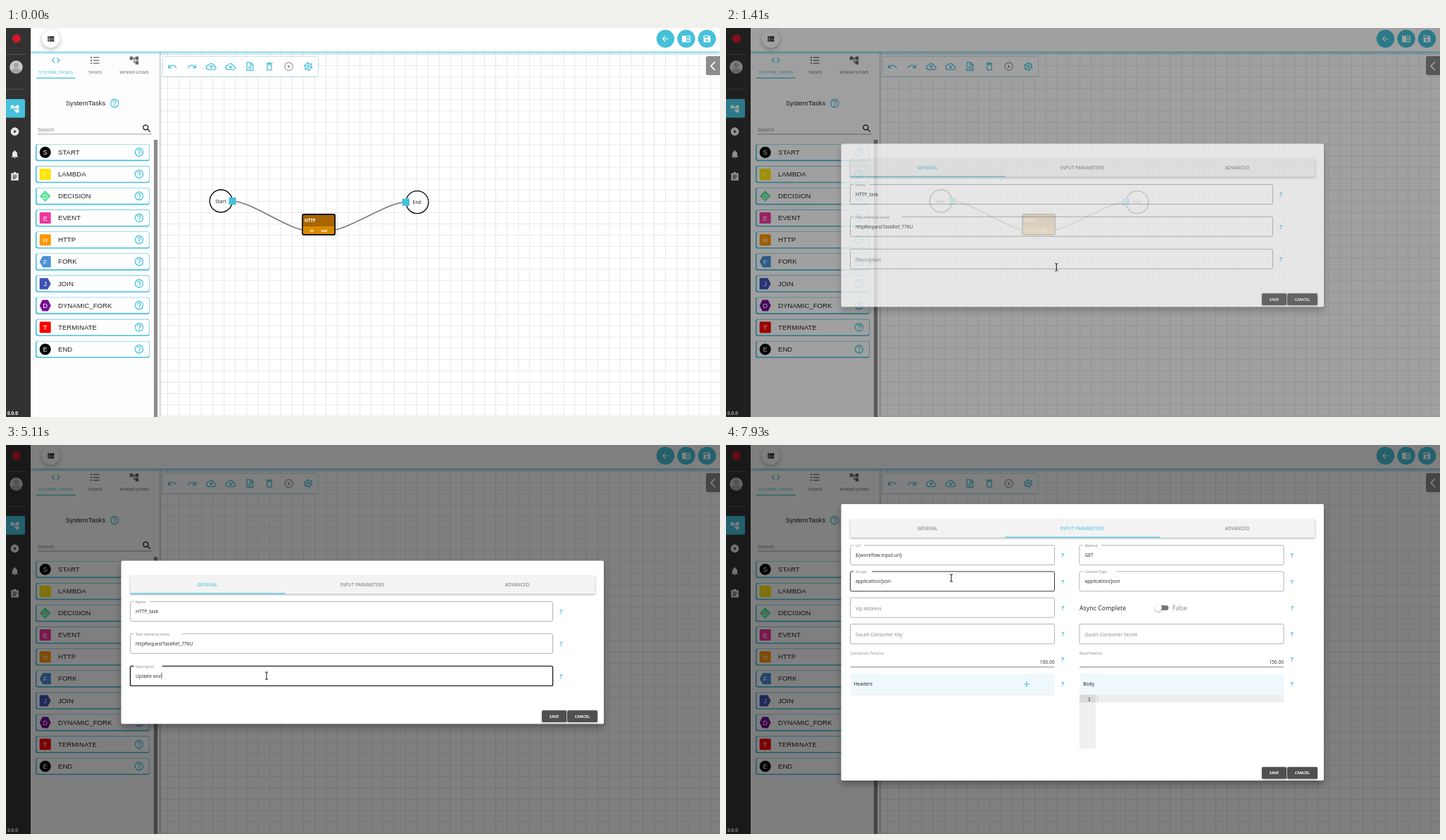
An HTML page for the animation above (8000 ms loop, 1014 by 553 pixels).

```html
<!DOCTYPE html>
<html lang="en">
<head>
<meta charset="utf-8">
<title>Workflow editor</title>
<style>
html, body { margin: 0; width: 100%; height: 100%; overflow: hidden; background: #fff; }
svg { display: block; }
text { font-family: "Noto Sans", sans-serif; white-space: pre; }
.arial { font-family: "Liberation Sans", Arial, sans-serif; }
.mono { font-family: "Liberation Mono", monospace; }
.bold { font-weight: 700; }
.mid { text-anchor: middle; }
.end { text-anchor: end; }
.soft { filter: drop-shadow(0 1px 1.5px rgba(0,0,0,.35)); }
.lifted { filter: drop-shadow(0 2px 3px rgba(0,0,0,.3)); }
.glow { filter: drop-shadow(0 .5px 1.2px rgba(50,150,180,.7)); }
.deep { filter: drop-shadow(0 5px 5px rgba(0,0,0,.32)); }
.line { fill: none; stroke: currentColor; stroke-width: 2; }
</style>
</head>
<body>
<svg id="stage" width="1014" height="553" viewBox="0 0 1014 553"></svg>
<script>
const CYAN = '#45c1da', LOOP = 8000, FONT = 6.66, GRID = 16.07;

const rect = (x, y, w, h, fill, more = '') =>
  `<rect x="${x}" y="${y}" width="${w}" height="${h}" fill="${fill}" ${more}/>`;
const circle = (x, y, r, fill, more = '') =>
  `<circle cx="${x}" cy="${y}" r="${r}" fill="${fill}" ${more}/>`;
const path = (d, more = '') => `<path d="${d}" ${more}/>`;
const text = (x, y, s, size, fill, cls = '', more = '') =>
  `<text x="${x}" y="${y}" font-size="${size}" fill="${fill}" class="${cls}" ${more}>${s}</text>`;
const group = (id, body, more = '') => `<g id="${id}" ${more}>${body}</g>`;

// Icons live on a 24-unit square.
const stroke = d => path(d, 'class="line"');
const solid = d => path(d, 'fill="currentColor" fill-rule="evenodd"');
const ring = stroke('M12 3a9 9 0 1 0 .01 0z');
const cloud = stroke('M6 19a5 5 0 0 1 0-10a6.6 6.6 0 0 1 12.4 2a4 4 0 0 1 .6 8z');
const icons = {
  code: stroke('M9 6.5L3.5 12l5.5 5.5M15 6.5l5.5 5.5-5.5 5.5'),
  list: solid('M2 4h3v3H2zM2 10.5h3v3H2zM2 17h3v3H2zM8 4.5h14v2H8zM8 11h14v2H8zM8 17.5h14v2H8z'),
  rows: solid('M4 5h4v4H4zM4 10h4v4H4zM4 15h4v4H4zM9 5h12v4H9zM9 10h12v4H9zM9 15h12v4H9z'),
  tree: solid('M22 11V3h-7v3H9V3H2v8h7V8h2v10h4v3h7v-8h-7v3h-2V8h2v3z'),
  undo: stroke('M3 8v7h7M3.5 14.5C9 7 18 8 21 16'),
  redo: stroke('M21 8v7h-7M20.5 14.5C15 7 6 8 3 16'),
  upload: cloud + solid('M8 13h2.5v3h3v-3H16l-4-4z'),
  download: cloud + solid('M8 13h2.5v-3h3v3H16l-4 4z'),
  file: stroke('M5 3h9l5 5v13H5zM13 3v6h6M8 13h8M8 17h8'),
  bin: stroke('M7 8h10v12H7zM5 5h14M9 4h6'),
  playRing: ring + solid('M10 7.5v9l6-4.5z'),
  play: solid('M12 2a10 10 0 1 0 .01 0zM10 7.5v9l6-4.5z'),
  gear: stroke('M12 5a7 7 0 1 0 .01 0zM12 9.5a2.5 2.5 0 1 0 .01 0z') +
    '<circle cx="12" cy="12" r="9" class="line" stroke-dasharray="4.2 5.225"/>',
  help: ring + stroke('M9 10a3 3 0 1 1 5 2.2q-2 1.5-2 2.8') + solid('M11 16h2v2h-2z'),
  search: stroke('M9.5 4a5.5 5.5 0 1 0 .01 0zM14 14l5.5 5.5'),
  bell: solid('M10 20h4a2 2 0 0 1-4 0M18 16v-5c0-3-1.6-5.6-4.5-6.3V4a1.5 1.5 0 0 0-3 0v.7C7.6 5.4 6 8 6 11v5l-2 2v1h16v-1z'),
  board: solid('M3 3h6a3 3 0 0 1 6 0h6v18H3zM7 7v2h10V7zM7 11v2h10v-2zM7 15v2h7v-2z'),
  back: stroke('M20 12H5M12 4.7L4.7 12l7.3 7.3'),
  book: solid('M1 4h22v17H1zM12 6v13h9V6zM13 9.5h7V11h-7zM13 12h7v1.5h-7zM13 14.5h7V16h-7z'),
  save: solid('M3 3h14l4 4v14H3zM5 5v4h10V5zM12 13a3 3 0 1 0 .01 0z'),
  left: stroke('M15.5 5L8.5 12l7 7'),
  plus: stroke('M12 5v14M5 12h14')
};
const icon = (name, cx, cy, size, color) =>
  `<g transform="translate(${cx - size / 2} ${cy - size / 2}) scale(${size / 24})" color="${color}">${icons[name]}</g>`;

function canvas() {
  const ends = [[305.3, 246, 'Start', 316.4, 241], [584, 247.7, 'End', 562.7, 242.4]];
  const tools = ['undo', 'redo', 'upload', 'download', 'file', 'bin', 'playRing', 'gear'];
  return `<defs><pattern id="grid" x="229" y="37" width="${GRID}" height="${GRID}" patternUnits="userSpaceOnUse">
      ${path(`M0 .5H${GRID}M.5 0V${GRID}`, 'stroke="#e8e8e8" fill="none"')}</pattern></defs>` +
    rect(217, 33, 797, 520, 'url(#grid)') +
    path('M321 246C348 246 402 288 429 288M459 288C486 288 541 247.5 568 247.5', 'fill="none" stroke="#777" stroke-width="1.6"') +
    ends.map(([x, y, s, px, py]) =>
      circle(x, y, 16, '#fff', 'stroke="#000" stroke-width="1.3"') +
      text(x - .3, y + 2.5, s, 6.8, '#222', 'mid') + rect(px, py, 10.3, 10.3, CYAN, 'rx="1"')).join('') +
    rect(421, 265, 46, 29, '#aa6500') + rect(421, 282, 46, 12, '#d98a00') +
    rect(421, 264.9, 46.2, 29, 'none', 'id="nodeEdge" rx="2" stroke-width="1.6"') +
    text(424, 275.5, 'HTTP', 6.1, '#fff', 'bold') +
    text(432, 290, 'in', 5.2, '#fff', 'bold') + text(447.5, 290, 'out', 5.2, '#fff', 'bold') +
    rect(223, 41, 220, 27.5, '#fff', 'rx="1" class="glow"') +
    tools.map((n, i) => icon(n, 236.3 + 27.55 * i, 54.7, 15, n === 'playRing' ? '#a0a0a0' : CYAN)).join('') +
    rect(994, 40, 24, 27, '#8c8c8c', 'rx="3"') + icon('left', 1004, 54, 20, '#fff');
}

const shapes = {
  circle: 'M8 0a8 8 0 1 0 .01 0z',
  square: 'M1.5 0h13q1.5 0 1.5 1.5v13q0 1.5-1.5 1.5h-13q-1.5 0-1.5-1.5v-13q0-1.5 1.5-1.5z',
  diamond: 'M8 0L16 8 8 16 0 8z',
  tagLeft: 'M4.5 0H16V16H4.5L0 8z',
  tagRight: 'M0 0H11.5L16 8 11.5 16H0z',
  hexagon: 'M4 0h8l4 8-4 8H4L0 8z'
};
const tasks = [
  ['START', 'circle', '#000'], ['LAMBDA', 'square', '#ffe500'], ['DECISION', 'diamond', '#5ce39b'],
  ['EVENT', 'square', '#f2359f'], ['HTTP', 'square', '#ff9500'], ['FORK', 'tagLeft', '#4a90d9'],
  ['JOIN', 'tagRight', '#3f51b5'], ['DYNAMIC_FORK', 'hexagon', '#760c98'],
  ['TERMINATE', 'square', '#f80000'], ['END', 'circle', '#000']
];

function taskRow([name, shape, color], i) {
  const y = 165 + 31.1 * i;
  return rect(42, y, 161.8, 24.2, CYAN, 'rx="3"') + rect(43.6, y + .6, 159.6, 22, '#fff', 'rx="2.4"') +
    path(shapes[shape], `fill="${color}" transform="translate(47.7 ${y + 3.8})"`) +
    text(55.7, y + 15.3, name[0], 9.5, '#fff', 'arial mid') +
    text(74, y + 14.9, name, 9.65, '#222', 'arial') + icon('help', 189, y + 11.6, 15, CYAN);
}

function chrome() {
  const tabs = [['code', 'SYSTEM_TASKS', 70.7, CYAN], ['list', 'TASKS', 126.3, '#666'], ['tree', 'WORKFLOWS', 182, '#666']];
  return rect(35, 33, 183, 520, '#fdfdfd', 'style="filter:drop-shadow(1px 0 1.5px rgba(0,0,0,.3))"') +
    rect(0, 0, 1014, 33.5, '#fff', 'style="filter:drop-shadow(0 2px 1.5px rgba(69,193,218,.8))"') +
    rect(0, 0, 35, 553, '#323232') +
    circle(15, 15, 6, '#d3172c') +
    rect(0, 37, 27, 1, '#555') + rect(0, 86.5, 27, 1, '#555') +
    circle(14.5, 55.5, 9.2, '#c8c8c8') + circle(14.5, 53, 3.6, '#a4a4a4') +
    path('M7.5 61.5q1.5-4.5 7-4.5t7 4.5a9.2 9.2 0 0 1-14 0z', 'fill="#a4a4a4"') +
    rect(-3, 101, 30, 26.5, CYAN, 'rx="2"') +
    ['tree', 'play', 'bell', 'board'].map((n, i) => icon(n, 12.5, 115 + 32.2 * i, 14, i ? '#e6e6e6' : '#fff')).join('') +
    text(17, 550, 'v 0.0.0', 6.6, '#fff', 'bold end') +
    circle(63.5, 15.3, 12.7, '#fff', 'class="lifted"') + icon('rows', 63.5, 15.5, 13, '#222') +
    ['back', 'book', 'save'].map((n, i) => circle(936.5 + 29.5 * i, 15.3, 12.7, CYAN) +
      icon(n, 936.5 + 29.5 * i, 15.3, 13, '#fff')).join('') +
    tabs.map(([n, s, x, c]) => icon(n, x, 46, 15, c) + text(x, 64.5, s, 6.2, c, 'arial mid')).join('') +
    rect(43, 70.5, 55.5, 1.3, CYAN) +
    text(84.7, 110, 'SystemTasks', 9.6, '#222', 'arial') + icon('help', 154.3, 107, 15, CYAN) +
    text(45, 147, 'Search', 7.4, '#888', 'arial') + rect(45, 150.5, 162, .8, '#888') + icon('search', 200, 143, 15.5, '#111') +
    rect(210, 159, 5.2, 394, '#8c8c8c') + tasks.map(taskRow).join('');
}

// x, y, width, label, value, notch end
const pages = [
  [[176.5, 222.5, 600, 'Name', 'HTTP_task', 204],
   [176.5, 268.3, 600, 'Task reference name', 'httpRequestTaskRef_776U', 250],
   [176.5, 314.4, 600, 'Description', '', 222]],
  [[176.5, 142.5, 290, 'Uri', '$' + '{workflow.input.uri}', 196], [502, 142.5, 290, 'Method', 'GET', 533],
   [176.5, 179.9, 290, 'Accept', 'application/json', 207], [502, 179.9, 290, 'Content Type', 'application/json', 554],
   [176.5, 217.2, 290, 'Vip Address', ''],
   [176.5, 254.6, 290, 'Oauth Consumer Key', ''], [502, 254.6, 290, 'Oauth Consumer Secret', '']]
];
const H = 28;
const border = ([x, y, w], notch) =>
  `M${notch || x + 5} ${y}H${x + w - 2}q2 0 2 2v${H - 4}q0 2-2 2H${x + 2}q-2 0-2-2v-${H - 4}q0-2 2-2H${x + 5}`;
const mark = (x, y) => text(x, y, '?', 9.3, CYAN, 'bold mid');

function field(f, page, i) {
  const [x, y, w, label, value, notch] = f, id = `f${page}_${i}`;
  return path(border(f, value && notch), `id="${id}" fill="none" stroke="#aaa"`) +
    (value ? text(x + 7.5, y + 2.5, label, 4.95, '#888') : text(x + 7.5, y + 17.5, label, FONT, '#888', '', `id="${id}_label"`)) +
    text(x + 7.5, y + 16.5, value, FONT, '#333', '', `id="${id}_value"`) +
    mark(x + w + 11.7, y + 17.7);
}

function inputExtras() {
  const number = (x, label, value) => text(x, 298, label, 4.95, '#888') +
    text(x + 290, 310.5, value, FONT, '#333', 'end') + rect(x, 315.3, 290, .9, '#777') + mark(x + 301.7, 307.5);
  const panel = (x, label) => rect(x, 325, 290, 30, '#eff9fd') +
    text(x + 5.2, 342.3, label, FONT, '#222', '', 'font-weight="500"') + mark(x + 301.7, 342.5);
  return text(502, 234.6, 'Async Complete', 8.8, '#333') + rect(610, 228, 18.5, 7, '#777', 'rx="3.5"') +
    circle(614, 231.5, 5, '#fff', 'class="soft"') + text(634, 234.6, 'False', 8.8, '#888') + mark(803.7, 234.9) +
    number(176.5, 'Connection TimeOut', '100.00') + number(502, 'ReadTimeOut', '150.00') +
    panel(176.5, 'Headers') + rect(176.5, 354.7, 290, .6, '#ddd') + icon('plus', 427, 340, 14, CYAN) +
    panel(502, 'Body') + rect(502, 355, 23, 76.5, '#efefef') + rect(502, 355, 290, 11, '#eee') +
    rect(502, 355, 23, 11, '#dadada') + text(518, 363.6, '1', 7, '#333', 'mono end') + rect(527, 356, .6, 9, '#bbb');
}

function dialog() {
  const button = (x, w, s) => rect(x, 377.3, w, 16.8, '#505050', 'rx="1.5" class="soft"') +
    text(x + w / 2, 387.7, s, 5.5, '#fff', 'bold mid');
  return rect(163.5, 164.5, 685.5, 232, '#fff', 'id="sheet" rx="2" class="deep"') +
    group('head', rect(176.5, 186, 660, 25.7, '#f3f3f3', 'class="soft"') +
      ['GENERAL', 'INPUT PARAMETERS', 'ADVANCED'].map((s, i) =>
        text(286 + 220 * i, 200.9, s, 6.6, '#777', 'mid', `id="tab${i}"`)).join('') +
      rect(176.5, 210.5, 220, 1.3, CYAN, 'id="slider"')) +
    pages.map((fields, p) => group('page' + p, fields.map((f, i) => field(f, p, i)).join('') + (p ? inputExtras() : ''))).join('') +
    rect(0, 323.5, .7, 9, '#222', 'id="caret"') +
    group('foot', button(761, 35, 'SAVE') + button(797, 43, 'CANCEL'));
}

const crossEdge = 'stroke="#fff" stroke-width=".6"', paperEdge = 'fill="#fff" stroke="#000" stroke-width=".7"';
const pointers = {
  move: path('M0-6.2l2.2 2.5H.6V-.6H3.7V-2.2L6.2 0 3.7 2.2V.6H.6V3.7H2.2L0 6.2-2.2 3.7H-.6V.6H-3.7V2.2L-6.2 0-3.7-2.2V-.6H-.6V-3.7H-2.2z', crossEdge),
  beam: path('M-2-5.3q2 0 2 1.2q0-1.2 2-1.2M0-4.5V4.5M-2 5.3q2 0 2-1.2q0 1.2 2 1.2', 'fill="none" stroke="currentColor"'),
  arrow: path('M0 0V10.5L2.4 8.2 4 11.8 5.6 11.1 4.1 7.6H7.4z', paperEdge),
  hand: path('M-1-5q1-1.5 2 0V-1l4 1q1 .5 .5 2L4.5 6H-1L-4 1.5q.5-1.5 3 0z', paperEdge)
};

document.getElementById('stage').innerHTML = canvas() + chrome() +
  rect(0, 0, 1014, 553, '#000', 'id="shade"') + group('dialog', dialog()) +
  group('pointer', Object.entries(pointers).map(([k, v]) => group(k, v)).join(''));

const $ = id => document.getElementById(id);
const set = (id, attrs) => { for (const k in attrs) $(id).setAttribute(k, attrs[k]); };
const show = (id, on) => set(id, { visibility: on ? 'inherit' : 'hidden' });
const progress = (t, from, span) => 1 - (1 - Math.min(1, Math.max(0, (t - from) / span))) ** 2;

const route = [
  [0, 1030, 580], [70, 982, 552], [260, 587.5, 377], [400, 587.5, 377], [870, 451.5, 274], [1300, 451.5, 274],
  [1410, 469.5, 340], [1480, 455, 344], [1810, 400, 344], [2090, 370, 328], [6380, 370, 328],
  [6450, 367.5, 316], [7040, 490, 206], [7480, 490, 206], [7860, 320, 189], [8000, 320, 189]
];
function along(t) {
  const i = Math.max(1, route.findIndex(p => p[0] > t));
  const [a, b] = [route[i - 1], route[i]], k = (t - a[0]) / (b[0] - a[0]);
  return [a[1] + (b[1] - a[1]) * k, a[2] + (b[2] - a[2]) * k];
}

const phrase = 'Update workflow';
const keyTimes = [3110, 3580, 3910, 3980, 4180, 4250, 4450, 4780, 4910, 5110, 5310, 5510, 5610, 5710, 5850];
const CLICK_NODE = 1010, OPEN = 1300, COVERED = 1340, FOCUS = 2230, SWITCH = 7200;

function draw(t) {
  const fade = progress(t, OPEN, 225), page = t < SWITCH ? 0 : 1;
  const [x, y] = along(t);

  set('nodeEdge', { stroke: t >= CLICK_NODE && t < COVERED ? CYAN : '#000' });
  set('shade', { opacity: fade / 2 });
  set('dialog', { opacity: fade });
  set('sheet', page ? { y: 84, height: 393 } : { y: 164.5, height: 232 });
  set('head', { transform: `translate(0 ${page ? -80 : 0})` });
  set('foot', { transform: `translate(0 ${page ? 80.5 : 0})` });
  set('slider', { x: 176.5 + 220 * progress(t, SWITCH, 300) });
  for (let i = 0; i < 3; i++) set('tab' + i, { fill: i === page ? CYAN : '#777' });
  pages.forEach((_, p) => show('page' + p, p === page));

  const over = pages[page].findIndex(f => x > f[0] && x < f[0] + f[2] && y > f[1] && y < f[1] + H);
  const focused = t >= FOCUS && !page;
  pages[page].forEach((f, i) => {
    const active = focused && i === 2;
    set(`f${page}_${i}`, {
      stroke: active || (i === over && t > 1800) ? '#222' : '#aaa', 'stroke-width': active ? 1.4 : .9
    });
  });

  const lift = progress(t, FOCUS, 200);
  set('f0_2', { d: border(pages[0][2], focused && 222) });
  set('f0_2_label', { y: 331.9 - 15 * lift, 'font-size': FONT - 1.71 * lift });
  const typed = $('f0_2_value');
  typed.textContent = phrase.slice(0, keyTimes.filter(k => k <= t).length);
  show('caret', (t >= 2300 && t < 2780) || (t >= 3110 && t < 5850));
  set('caret', { x: 184 + typed.getComputedTextLength() });

  const kind = t < CLICK_NODE ? 'move' : t < COVERED || over >= 0 ? 'beam' :
    !page && y > 186 && y < 212 ? 'hand' : 'arrow';
  for (const k in pointers) show(k, k === kind);
  show('pointer', t >= 70);
  set('pointer', { transform: `translate(${x} ${y})`, color: t < COVERED ? '#7d8490' : '#111' });
}

const start = performance.now();
(function tick() {
  draw((performance.now() - start) % LOOP);
  requestAnimationFrame(tick);
})();
</script>
</body>
</html>
```
